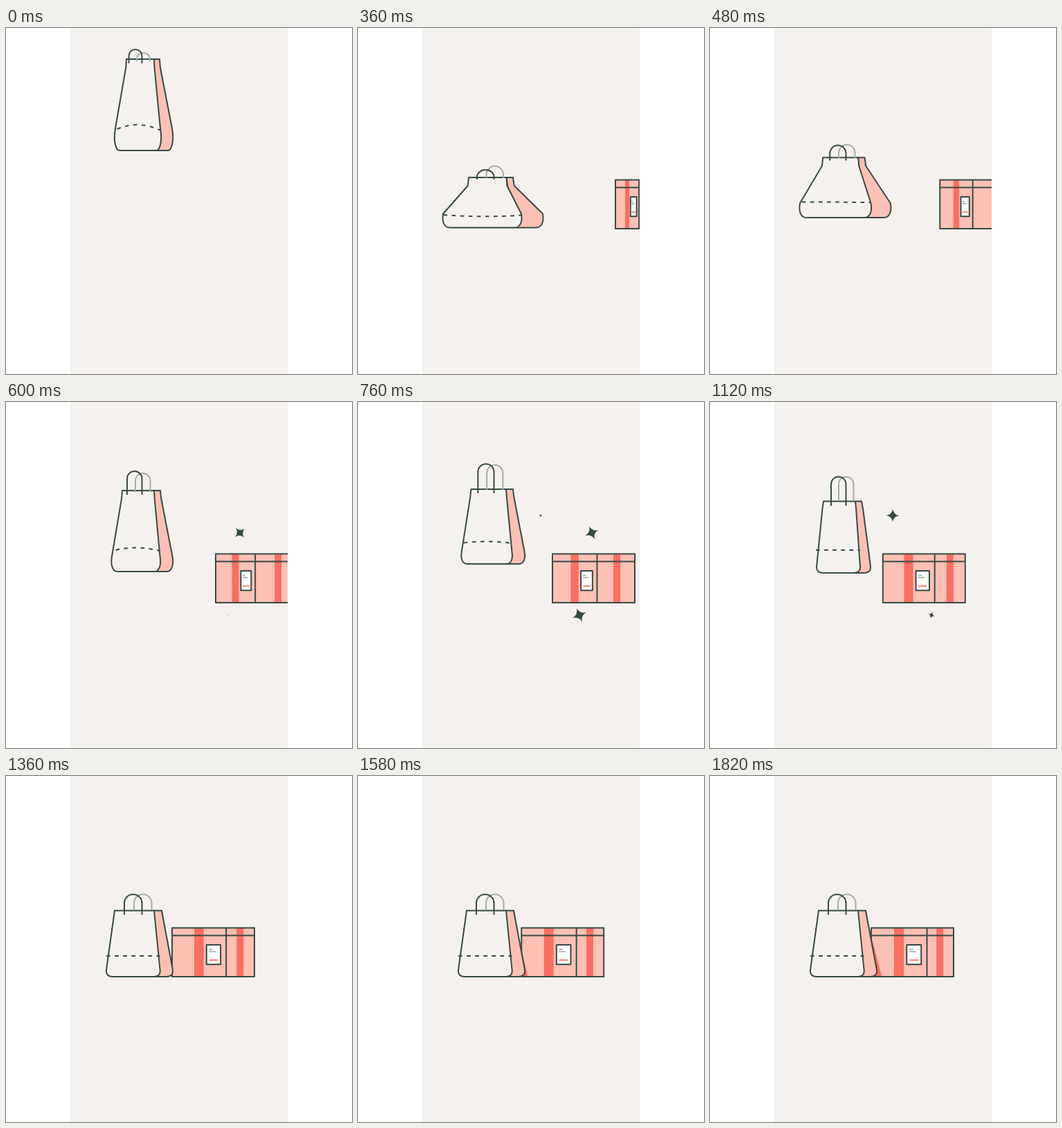
Recreate the animation shown at these times as an HTML page with a canvas. Size 500 by 500 pixels, loop 1.84 s.

```html
<!DOCTYPE html>
<html>
<head>
<meta charset="utf-8">
<title>Bag and box</title>
<style>
html, body { margin: 0; width: 100%; height: 100%; overflow: hidden; background: #fff; }
canvas { display: block; width: 500px; height: 500px; }
</style>
</head>
<body>
<canvas id="stage" width="500" height="500"></canvas>
<script>
const ctx = document.getElementById('stage').getContext('2d');
const PAPER = '#f5f1ee', INK = '#374a44', PINK = '#fcc0b5', RED = '#f96f61', GREY = '#a3ada8';
const LOOP = 1840, HOLD = 220, STEP = 20;

// Bag poses: heights are relative to the bottom edge y.
const rest = {
  y: 290, top: -95.5, topL: 157, topM: 214, topR: 225, neck: 1,
  shoulder: -11, left: 145.2, mid: 222.5, right: 240.8, corner: 9,
  dashX: 145, dash: -30, arc: 0,
  handleX: 171, handleTop: -119, foot: -89.5, backX: 185, backTop: -119
};
const tall = {
  y: 177, top: -132, topL: 174, topM: 214, topR: 222, neck: 0.4,
  shoulder: -32, left: 158, mid: 223, right: 240, corner: 6,
  dashX: 160.5, dash: -31, arc: 7,
  handleX: 177.5, handleTop: -146, foot: -126, backX: 189, backTop: -141
};
const flat = {
  y: 288.5, top: -72.5, topL: 160, topM: 214.5, topR: 224, neck: 0.8,
  shoulder: -20, left: 123, mid: 236, right: 267, corner: 10,
  dashX: 123.5, dash: -18.5, arc: -2,
  handleX: 172, handleTop: -83.5, foot: -69.5, backX: 185.5, backTop: -89
};
const rising = {
  y: 245, top: -117, topL: 168, topM: 214, topR: 223, neck: 0.6,
  shoulder: -22, left: 153, mid: 222.5, right: 240.5, corner: 8,
  dashX: 158.5, dash: -31, arc: 4,
  handleX: 175, handleTop: -145, foot: -111, backX: 187, backTop: -142
};
const falling = {
  ...rest, y: 247, top: -103.5, topL: 164, topM: 210, topR: 219,
  left: 154.3, mid: 216.8, right: 231.8, dashX: 153, dash: -33,
  handleX: 175, handleTop: -139, foot: -97, backX: 186, backTop: -139
};
const landed = {
  ...rest, top: -88, left: 136.2, mid: 227, right: 250, dashX: 136, dash: -27,
  handleTop: -107, foot: -82, backTop: -109
};
const bagKeys = [
  [220, tall],
  [300, { ...tall, y: 213 }],
  [360, flat],
  [390, { ...flat, y: 290, top: -67, left: 115, mid: 239, right: 274, dashX: 116,
          dash: -17, handleTop: -78, foot: -64, backTop: -82 }],
  [600, rising],
  [960, { ...rest, y: 228, handleTop: -143.5, foot: -90, backTop: -143.5 }],
  [1120, falling],
  [1220, { ...falling, y: 281, handleTop: -134, backTop: -134 }],
  [1270, landed],
  [1300, { ...landed, top: -91, left: 140, mid: 225, right: 246, dashX: 140,
           dash: -28.5, handleTop: -113, foot: -85, backTop: -114 }],
  [1345, rest]
];
const boxKeys = [[220, 440], [360, 372], [600, 303], [760, 281], [960, 259.8],
                 [1120, 249.8], [1360, 240], [1820, 233]];
const stars = [
  { x: 338, y: 189, r: 10, from: 490, peak: 640, fade: 840, to: 1125, level: 950 },
  { x: 320, y: 308, r: 11, from: 590, peak: 800, fade: 890, to: 1210, level: 950 },
  { x: 264, y: 164, r: 12.2, from: 740, peak: 900, fade: 920, to: 1370, level: 1110 }
];

// Monotone cubic through [time, value] pairs.
function curve(keys, t) {
  const last = keys.length - 1;
  if (t <= keys[0][0]) return keys[0][1];
  if (t >= keys[last][0]) return keys[last][1];
  const slope = i => (keys[i + 1][1] - keys[i][1]) / (keys[i + 1][0] - keys[i][0]);
  const tangent = i => {
    if (i === 0) return slope(0);
    if (i === last) return slope(last - 1);
    const a = slope(i - 1), b = slope(i);
    return a * b <= 0 ? 0 : 2 * a * b / (a + b);
  };
  const i = keys.findIndex(k => k[0] > t) - 1;
  const h = keys[i + 1][0] - keys[i][0], u = (t - keys[i][0]) / h, v = 1 - u;
  return v * v * (1 + 2 * u) * keys[i][1] + u * u * (3 - 2 * u) * keys[i + 1][1]
    + h * u * v * (v * tangent(i) - u * tangent(i + 1));
}

function bagPose(t) {
  const pose = {};
  for (const name in rest) pose[name] = curve(bagKeys.map(([k, p]) => [k, p[name]]), t);
  return pose;
}

function rect(x, y, w, h, fill) {
  ctx.fillStyle = fill;
  ctx.fillRect(x, y, w, h);
}

function line(x1, y1, x2, y2, color = INK, width = 2) {
  ctx.beginPath();
  ctx.moveTo(x1, y1);
  ctx.lineTo(x2, y2);
  ctx.strokeStyle = color;
  ctx.lineWidth = width;
  ctx.stroke();
}

function outline(fill) {
  ctx.fillStyle = fill;
  ctx.fill();
  ctx.strokeStyle = INK;
  ctx.lineWidth = 2;
  ctx.stroke();
}

function drawBox(x) {
  const width = 119, top = 219.5, bottom = 290, height = bottom - top;
  const front = 80.5 - (x - 233) / 3, edge = x + front;
  const sideStrap = edge + (width - front) * 0.615 - 10;
  rect(x, top, width, height, PINK);
  rect(x + front * 0.41, top, front * 0.175, height, RED);
  rect(sideStrap, top, 10, height, RED);

  const shade = Math.max(0, (240 - x) / 7);
  if (shade) {
    ctx.save();
    ctx.beginPath();
    ctx.rect(x, top, width, height);
    ctx.clip();
    ctx.beginPath();
    ctx.moveTo(222.7, 194);
    ctx.lineTo(242 + 6.5 * shade, bottom);
    ctx.lineTo(220, bottom);
    ctx.fillStyle = RED;
    ctx.fill();
    ctx.restore();
  }

  line(x, 230.5, x + width, 230.5);
  line(edge, top, edge, bottom);
  ctx.beginPath();
  ctx.rect(x, top, width, height);
  ctx.strokeStyle = INK;
  ctx.stroke();

  const lx = x + front * 0.637, lw = front * 0.26;
  ctx.beginPath();
  ctx.rect(lx, 244, lw, 28.2);
  outline('#fff');
  const mark = (y, end, color) => line(lx + lw * 0.18, y, lx + lw * end, y, color, 1.7);
  mark(250.5, 0.45, GREY);
  mark(253.7, 0.65, GREY);
  mark(266, 0.83, RED);
}

function drawHandle(x, width, top, foot, color) {
  const rx = width / 2, ry = Math.min(rx, foot - top - 4);
  ctx.beginPath();
  ctx.moveTo(x, foot);
  ctx.lineTo(x, top + ry);
  ctx.ellipse(x + rx, top + ry, rx, ry, 0, Math.PI, 2 * Math.PI);
  ctx.lineTo(x + width, foot);
  ctx.strokeStyle = color;
  ctx.lineWidth = 2;
  ctx.stroke();
}

function drawBag(p) {
  const top = p.y + p.top, neckY = top + 12, shoulderY = p.y + p.shoulder;
  const bulge = -p.shoulder * 0.11, bendY = shoulderY - p.shoulder * 0.65;
  const rightEdge = (x, neckX, sx) => {
    ctx.lineTo(x, top);
    ctx.lineTo(neckX, neckY);
    ctx.lineTo(sx, shoulderY);
    ctx.bezierCurveTo(sx + bulge, bendY, sx - p.corner * 0.25, p.y, sx - p.corner, p.y);
  };

  ctx.beginPath();
  ctx.moveTo(p.topM, top);
  rightEdge(p.topR, p.topR + 2.2 * p.neck, p.right);
  ctx.lineTo(p.mid - p.corner - 2, p.y);
  ctx.closePath();
  outline(PINK);

  ctx.beginPath();
  ctx.moveTo(p.topL, top);
  rightEdge(p.topM, p.topM + 1.2 * p.neck, p.mid);
  ctx.lineTo(p.left + p.corner, p.y);
  ctx.bezierCurveTo(p.left + p.corner * 0.25, p.y, p.left - bulge, bendY, p.left, shoulderY);
  ctx.lineTo(p.topL - 1.7 * p.neck, neckY);
  ctx.closePath();
  outline(PAPER);

  const dashY = p.y + p.dash, tilt = (1 - p.neck) * 3;
  ctx.beginPath();
  ctx.moveTo(p.dashX, dashY);
  ctx.quadraticCurveTo((p.dashX + p.mid) / 2, dashY + tilt / 2 - 2 * p.arc, p.mid, dashY + tilt);
  ctx.setLineDash([5.6, 6.5]);
  ctx.strokeStyle = INK;
  ctx.stroke();
  ctx.setLineDash([]);

  const width = 196.5 - p.handleX;
  drawHandle(p.backX, width, p.y + p.backTop, top - 0.5 + (1 - p.neck) * 6, GREY);
  drawHandle(p.handleX, width, p.y + p.handleTop, p.y + p.foot, INK);
}

function drawStar(s, t) {
  if (t <= s.from || t >= s.to) return;
  const grow = Math.min(1, (t - s.from) / (s.peak - s.from));
  const shrink = Math.min(1, (s.to - t) / (s.to - s.fade));
  const r = s.r * Math.sin(Math.PI / 2 * Math.min(grow, shrink));
  const c = r * 0.14;
  ctx.save();
  ctx.translate(s.x, s.y);
  ctx.rotate((t - s.level) * 0.12 * Math.PI / 180);
  ctx.beginPath();
  ctx.moveTo(0, -r);
  ctx.quadraticCurveTo(c, -c, r, 0);
  ctx.quadraticCurveTo(c, c, 0, r);
  ctx.quadraticCurveTo(-c, c, -r, 0);
  ctx.quadraticCurveTo(-c, -c, 0, -r);
  ctx.fillStyle = INK;
  ctx.fill();
  ctx.restore();
}

function draw(t) {
  rect(0, 0, 500, 500, '#fff');
  ctx.save();
  ctx.beginPath();
  ctx.rect(93, 0, 314, 500);
  ctx.clip();
  rect(93, 0, 314, 500, PAPER);
  ctx.lineJoin = 'round';
  drawBox(curve(boxKeys, t));
  drawBag(bagPose(t));
  stars.forEach(s => drawStar(s, t));
  ctx.restore();
}

const start = performance.now();
function tick() {
  const t = (performance.now() - start) % LOOP;
  draw(t < HOLD ? 0 : Math.floor(t / STEP) * STEP);
  requestAnimationFrame(tick);
}
tick();
</script>
</body>
</html>
```
